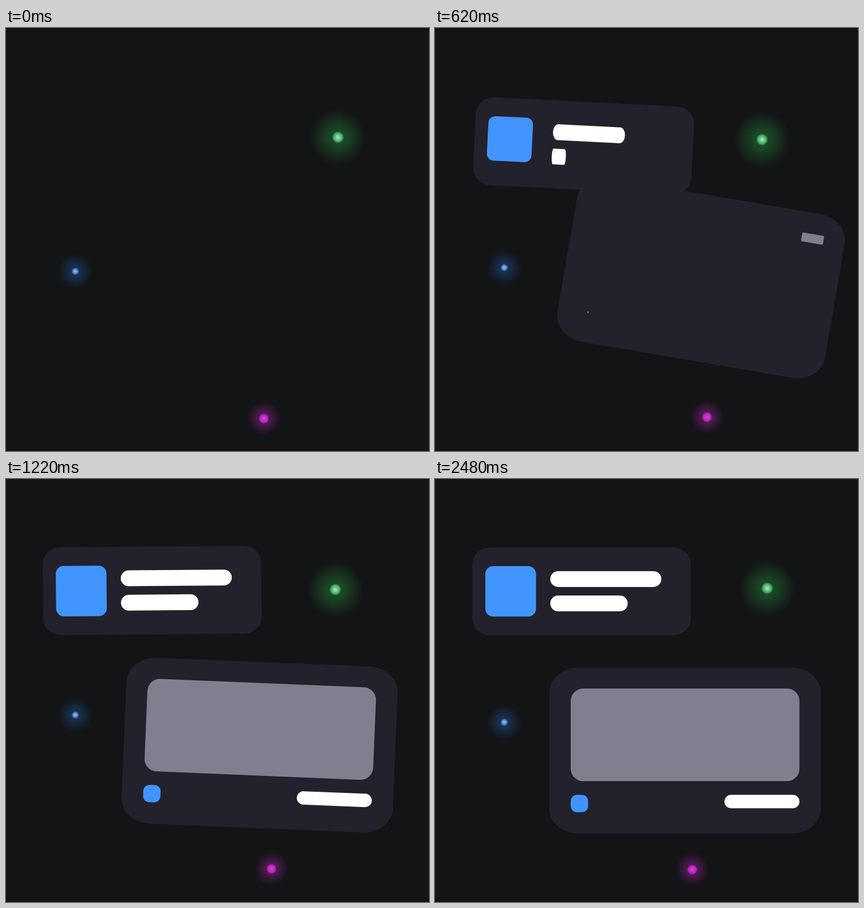
An HTML page with a canvas for the animation above (2500 ms loop, 748 px wide and 748 px high).

```html
<!DOCTYPE html>
<html lang="en">
<head>
<meta charset="utf-8">
<title>Floating cards</title>
<style>
  html, body { margin: 0; width: 100%; height: 100%; overflow: hidden; background: #131415; }
  canvas { display: block; }
</style>
</head>
<body>
<canvas id="stage" width="748" height="748"></canvas>
<script>
const LOOP = 2500;
const SIZE = 748;
const CARD = '#23222c', BLUE = '#4294ff', GRAY = '#7f7f90', WHITE = '#ffffff';
const ctx = document.getElementById('stage').getContext('2d');

// Eased value between keys given as [time, value].
function track(t, keys) {
  if (t <= keys[0][0]) return keys[0][1];
  for (let i = 1; i < keys.length; i++) {
    const [t0, a] = keys[i - 1], [t1, b] = keys[i];
    if (t < t1) {
      const p = (t - t0) / (t1 - t0);
      return a + (b - a) * p * p * (3 - 2 * p);
    }
  }
  return keys[keys.length - 1][1];
}

// Grows from nothing past full size, then settles at 1.
const pop = (t, start, rise, peak, settle) =>
  track(t, [[start, 0], [start + rise, peak], [start + rise + settle, 1]]);

function box(color, x, y, w, h, rx, ry = rx) {
  if (w <= 0 || h <= 0) return;
  ctx.fillStyle = color;
  ctx.beginPath();
  ctx.roundRect(x, y, w, h, { x: rx, y: ry });
  ctx.fill();
}

// Rounded box scaled around an anchor given as a fraction of its size.
function scaled(color, x, y, w, h, r, sx, sy, ax, ay) {
  box(color, x + w * ax * (1 - sx), y + h * ay * (1 - sy), w * sx, h * sy, r * sx, r * sy);
}

function disc(x, y, r, stops) {
  const fill = ctx.createRadialGradient(x, y, 0, x, y, r);
  stops.forEach(([at, color]) => fill.addColorStop(at, color));
  ctx.fillStyle = fill;
  ctx.beginPath();
  ctx.arc(x, y, r, 0, Math.PI * 2);
  ctx.fill();
}

function glow(x, y, r, core, rgb, alpha, bright, edge) {
  const tint = a => `rgba(${rgb},${a})`;
  disc(x, y, r, [[0, tint(alpha)], [0.3, tint(alpha * 0.85)], [0.65, tint(alpha * 0.42)], [1, tint(0)]]);
  disc(x, y, core, [[0, bright], [0.75, edge], [1, tint(0.2)]]);
}

function drawGlows(t) {
  const wave = shift => Math.cos((t - shift) / LOOP * Math.PI * 2);
  const drift = wave(2000);
  glow(585 + 7 * drift, 194.3 - 3.3 * drift, 50, 10.5, '38,150,66', 0.44, '#a4f7ba', '#45a060');
  glow(122.5, 423.7 + 6.5 * wave(0), 31, 6.8, '28,88,160', 0.46, '#a5c8fa', '#3f70b8');
  glow(462 - 20 * drift, 690 + 2 * drift, 30, 9, '170,34,175', 0.46, '#e53ae6', '#b326b5');
}

function place(x, y, degrees, draw) {
  ctx.save();
  ctx.translate(x, y);
  ctx.rotate(degrees * Math.PI / 180);
  draw();
  ctx.restore();
}

// Hinged on its lower left corner.
function drawProfile(t) {
  const sx = track(t, [[20, 0], [220, 1]]), sy = track(t, [[0, 0], [200, 1]]);
  const r = Math.sqrt(sx * sy);
  const x = track(t, [[0, -12], [280, 66]]), y = track(t, [[0, 270], [280, 276.3]]);
  const angle = track(t, [[60, -26], [710, 4.4], [800, 4.4], [1270, -0.65], [1640, 0]]);
  place(x, y, angle, () => {
    box(CARD, 0, -155.3 * sy, 386.3 * sx, 155.3 * sy, 32 * r, 29 * r);
    const icon = pop(t, 300, 430, 1.05, 160);
    scaled(BLUE, 23, -122.3, 89.6, 89.3, 14, icon, icon, 0, 0);
    scaled(WHITE, 137.8, -113.4, 196.4, 28, 14, pop(t, 380, 430, 1.1, 160), 1, 0, 0);
    scaled(WHITE, 137.8, -70.2, 137, 28, 14, pop(t, 510, 430, 1.1, 160), 1, 0, 0);
  });
}

// Hinged on its lower right corner.
function drawPreview(t) {
  const sx = track(t, [[270, 0], [590, 1]]), sy = track(t, [[220, 0], [530, 1]]);
  const r = Math.sqrt(sx * sy);
  const x = track(t, [[240, 759], [590, 682.2]]), y = track(t, [[240, 620], [590, 627.2]]);
  const angle = track(t, [[240, -8.5], [650, 10], [1120, 2.3], [1400, 2.5], [1880, 0]]);
  place(x, y, angle, () => {
    box(CARD, -480 * sx, -293.7 * sy, 480 * sx, 293.7 * sy, 52 * r, 44 * r);
    const image = pop(t, 540, 430, 1.043, 200);
    scaled(GRAY, -442.2, -256.6, 404.5, 163.7, 22, image, image, 1, 0);
    const dot = pop(t, 560, 400, 1.32, 230);
    scaled(BLUE, -442.2, -68.6, 30.7, 30.6, 11, dot, dot, 0.5, 0.5);
    scaled(WHITE, -170.4, -68.6, 132.7, 23.6, 11.8, pop(t, 620, 350, 1.245, 230), 1, 1, 0);
  });
}

function draw(t) {
  ctx.fillStyle = '#131415';
  ctx.fillRect(0, 0, SIZE, SIZE);
  drawGlows(t);
  drawProfile(t);
  drawPreview(t);
}

const began = performance.now();
function tick() {
  draw((performance.now() - began) % LOOP);
  requestAnimationFrame(tick);
}
tick();
</script>
</body>
</html>
```
